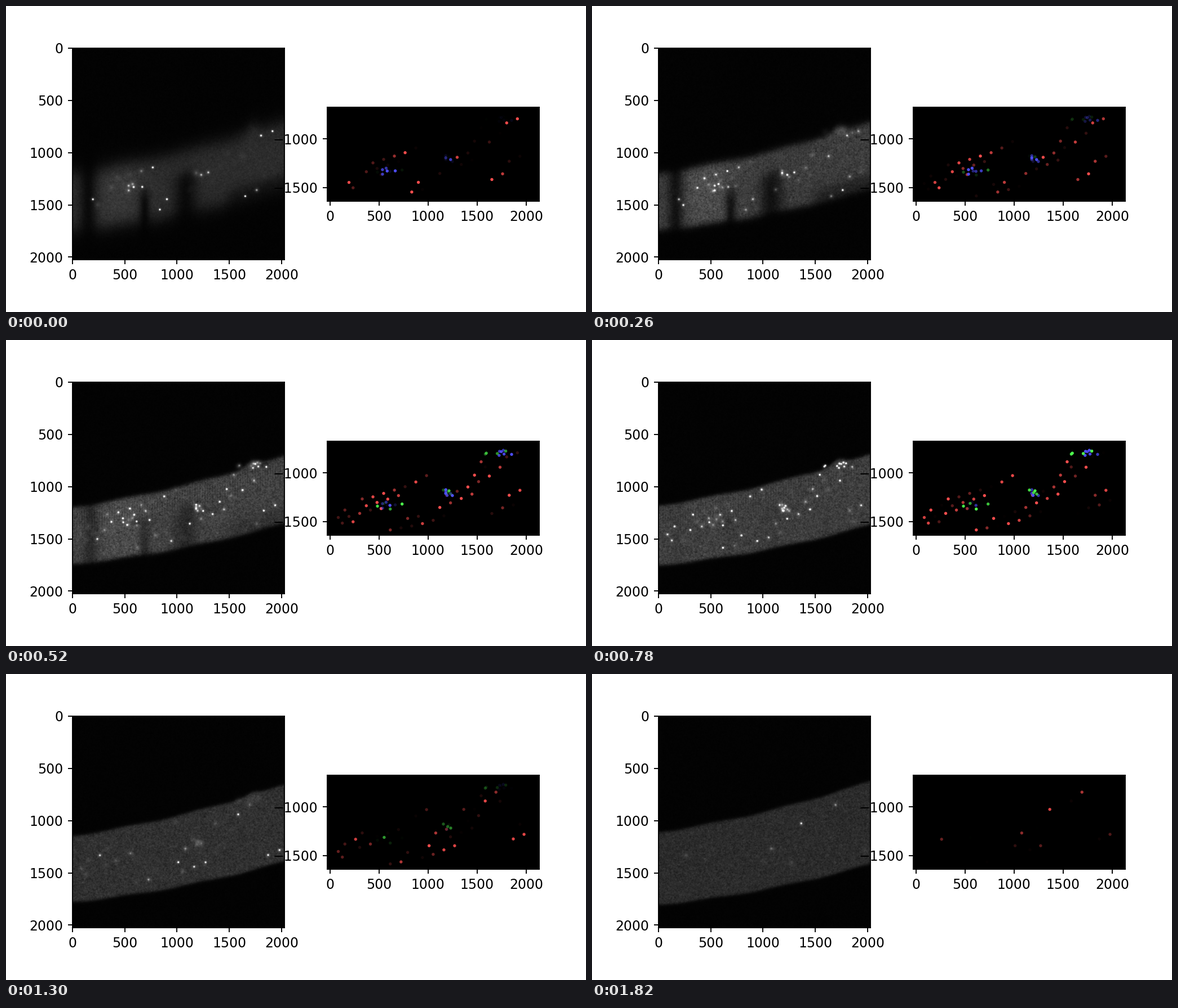
A matplotlib script for the animation above (1.95 s loop, 1029 by 544 pixels).

```python
import numpy as np
import matplotlib.pyplot as plt
from matplotlib.animation import FuncAnimation

WIDTH, HEIGHT, DPI = 1029, 544, 128
FRAMES, INTERVAL = 15, 130
PT = 72 / DPI          # points per pixel
SPAN, CELLS = 2025, 376
FOCUS = 2              # depth range over which a marker fades
GOLDEN = (5 ** 0.5 - 1) / 2

RED, GREEN, BLUE = (1, 0.31, 0.31), (0.31, 1, 0.31), (0.31, 0.31, 1)
CLUSTERS = [(590, 1335, 2), (1190, 1205, 3), (1750, 795, 5)]  # x, y, depth

axis = (np.arange(CELLS) + 0.5) * SPAN / CELLS
X, Y = np.meshgrid(axis, axis)


def bell(x, centre, width):
    return np.exp(-0.5 * ((x - centre) / width) ** 2)


def step(x, softness):
    return 0.5 * (1 + np.tanh(x / softness))


def fibre(x, z):
    """Upper and lower edge: parallel curves that part with depth."""
    u = x / SPAN
    growth = np.maximum(z - 4, 0)
    ripple = 6 * np.sin(x / 110)
    bulge = 55 * bell(x, 1715, 60) * np.exp(-(z / 11) ** 4)
    top = 1200 - 300 * u - 190 * u ** 2 - 8.7 * growth - bulge + ripple
    bottom = 1740 - 200 * u - 190 * u ** 2 + 6.5 * growth + ripple
    return top, bottom


def blur(a):
    for ax in (0, 1):
        a = 0.5 * a + 0.25 * (np.roll(a, 1, ax) + np.roll(a, -1, ax))
    return a


def scattered(count, rng):
    """Spots spread evenly over the fibre, sharp at random depths."""
    i = np.arange(1, count + 1)
    z = np.abs(rng.normal(5.5, 3.3, count))
    x = 60 + 1960 * (i * GOLDEN % 1)
    top, bottom = fibre(x, z)
    y = top + 30 + (np.minimum(bottom, 1610) - top - 50) * (i * 0.7549 % 1)
    return np.column_stack([x, y, z])


def clustered(count, spread, deeper, rng):
    return np.vstack([
        np.array([x, y, z + deeper])
        + rng.normal(size=(count, 3)) * [spread, 0.4 * spread, 1.7]
        for x, y, z in CLUSTERS])


def add_spots(img, spots, z, peak, halo):
    """Sharp core near focus, wide faint halo further away."""
    x, y, depth = spots.T
    d = np.abs(depth - z)
    for height, focus, width in ((peak, 1.1, 5 + 0.8 * d),
                                 (halo, 2.0, 10 + 3.5 * d)):
        gain = height * bell(d, 0, focus)
        gx = bell(axis[None], x[:, None], width[:, None])
        gy = bell(axis[None], y[:, None], width[:, None])
        img += (gy * gain[:, None]).T @ gx


def tissue(z):
    top, bottom = fibre(axis, z)
    soft = 16 + 75 * np.exp(-z / 1.5)
    body = step(Y - top, soft) * step(bottom - Y, soft)

    # Clefts between the cells close with depth, and the cells even out.
    cleft = bell(X, 150 + 6 * z, 62 - 5 * z / 2)
    cleft += bell(X, 690, 38) * step(Y - top - 290, 80)
    cleft += bell(X, 1080, 80) * step(Y - top - 210, 70)
    cleft += 0.7 * step(X - 1480, 60) * step(Y - bottom + 130, 70)
    opening = np.exp(-(z / 4.5) ** 3)
    body *= 1 + 0.3 * opening * bell(X, 440, 180)
    body *= 1 - 0.82 * opening * np.clip(cleft, 0, 1)

    # Dim pockets around the clusters.
    for x, y, _ in CLUSTERS:
        body *= 1 - 0.4 * bell(z, 4, 1.5) * bell(X, x + 40, 85) * bell(Y, y, 28)
    return body * (40 + 22 * bell(z, 4, 3.5)) * (1 - 0.2 * np.exp(-z))


def micrograph(z):
    rng = np.random.RandomState(40 + z)
    grain = blur(rng.normal(size=X.shape))
    mottle = blur(blur(blur(rng.normal(size=X.shape))))
    flecks = np.clip(blur(rng.normal(size=X.shape)) - 0.9, 0, None)
    stripes = np.sin(X * 2 * np.pi / 24) * bell(Y - fibre(axis, z)[0], 130, 90)
    texture = 0.25 * grain + 0.2 * mottle + 0.5 * flecks
    texture += 0.09 * stripes * bell(z, 4.5, 1.8)
    texture *= 1 - 0.45 * np.exp(-z)

    img = 3 + 1.2 * grain + tissue(z) * (1 + texture)
    add_spots(img, SPOTS, z, 310, 48)
    return np.clip(img, 0, 255)


seeded = np.random.RandomState(7)
layers = [(scattered(54, seeded), RED),
          (clustered(6, 45, 0, seeded), BLUE),
          (clustered(4, 85, 3, seeded), GREEN)]
SPOTS = np.vstack([spots for spots, _ in layers])
COLORS = np.vstack([np.tile(rgb, (len(spots), 1)) for spots, rgb in layers])

fig = plt.figure(figsize=(WIDTH / DPI, HEIGHT / DPI), dpi=DPI,
                 facecolor="white")


def panel(left, top, right, bottom):
    ax = fig.add_axes([left / WIDTH, 1 - bottom / HEIGHT,
                       (right - left) / WIDTH, (bottom - top) / HEIGHT])
    ax.set_facecolor("black")
    ax.tick_params(labelsize=23.6 * PT, length=8.2 * PT, pad=8.2 * PT,
                   width=1.9 * PT, labelfontfamily="DejaVu Sans")
    for spine in ax.spines.values():
        spine.set_linewidth(1.9 * PT)
    ax.set_xticks(range(0, 2001, 500))
    return ax


stack = panel(117.8, 75, 493.8, 451)
picture = stack.imshow(np.zeros((CELLS, CELLS)), cmap="gray", vmin=0, vmax=255,
                       extent=(0, SPAN, SPAN, 0), aspect="auto",
                       interpolation="nearest")
stack.set_xticks(range(0, 2001, 500))
stack.set_yticks(range(0, 2001, 500))

chart = panel(570, 180, 946, 347)
chart.set_xlim(-26, 2133)
chart.set_ylim(-1639, -676)
chart.set_yticks([-1500, -1000])
dots = chart.scatter(SPOTS[:, 0], -SPOTS[:, 1], s=(5.4 * PT) ** 2,
                     linewidths=0)


def update(z):
    picture.set_data(micrograph(z))
    alpha = bell(SPOTS[:, 2], z, FOCUS)
    dots.set_facecolors(np.column_stack([COLORS, alpha]))
    return picture, dots


anim = FuncAnimation(fig, update, frames=FRAMES, interval=INTERVAL,
                     repeat=True, repeat_delay=0, blit=False)
plt.show()
```
